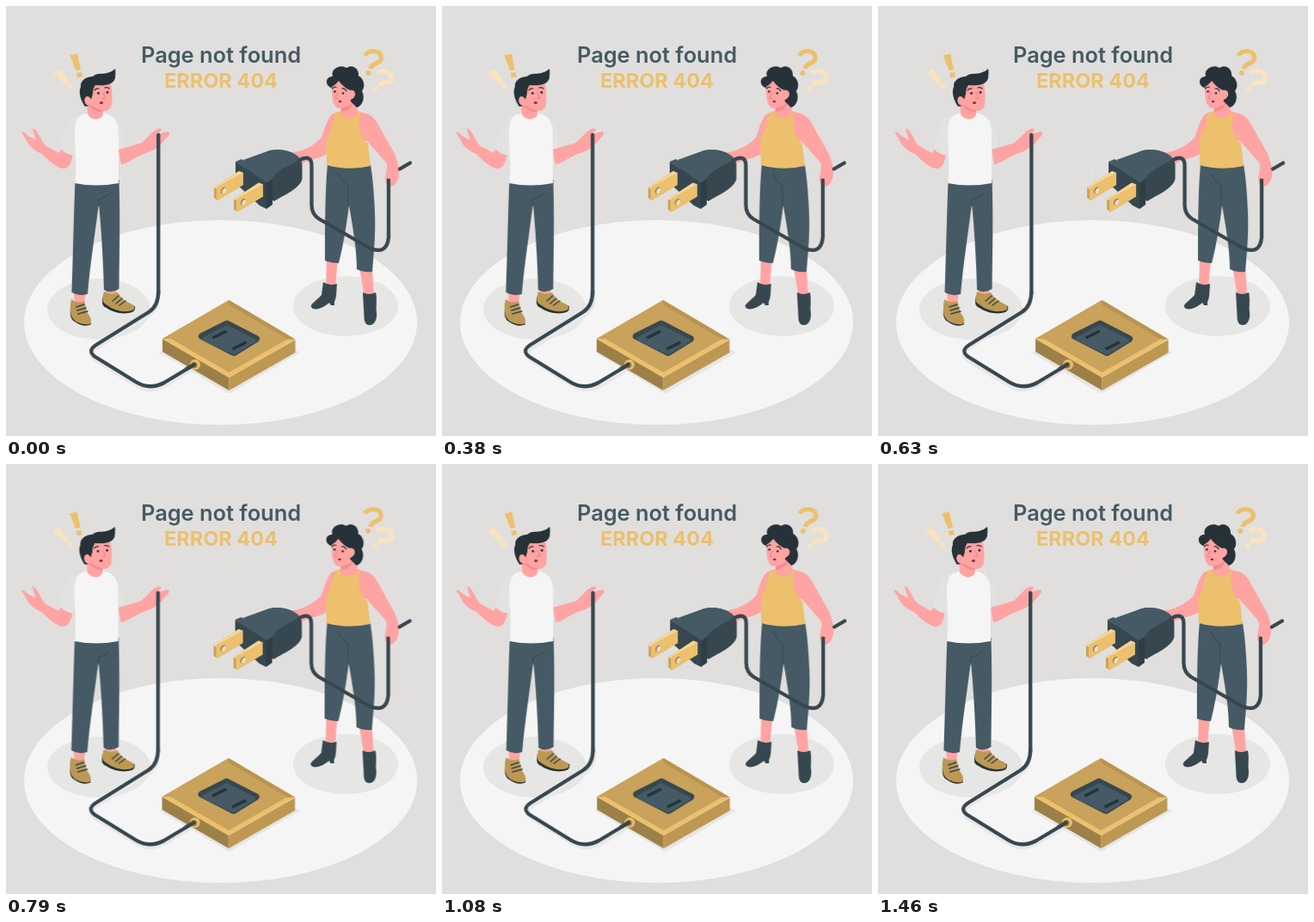
An HTML page without scripts that plays this animation: 500x500 px, repeating every 1500 ms.

```html
<!DOCTYPE html>
<html lang="en">
<head>
<meta charset="utf-8">
<title>Page not found</title>
<style>
  html, body { margin: 0; width: 100%; height: 100%; overflow: hidden; background: #e0dfdd; }
  svg { display: block; width: 100%; height: 100%; }
  text { font-family: Inter, Roboto, sans-serif; text-anchor: middle; }
  .title { font-size: 25.4px; font-weight: 600; fill: #455a64; }
  .code { font-size: 23.5px; font-weight: 750; fill: #ecc06c; }

  .skin { fill: #ffa3a3; }
  .blush { fill: #f58b8d; }
  .ink { fill: #263238; }
  .dark { fill: #37474f; }
  .slate { fill: #455a64; }
  .gold { fill: #ecc06c; }
  .ochre { fill: #c9a25b; }
  .tan { fill: #bd9853; }
  .bronze { fill: #9d8047; }
  .cream { fill: #f9e4bd; }
  .shade { fill: #e6e6e5; }
  .sleeve { fill: #e2e2e1; }
  .line { fill: none; stroke-linecap: round; stroke-linejoin: round; }
  .cable { stroke: #37474f; stroke-width: 4.3; }
  .crease { stroke: #37474f; stroke-width: 1; }
  .face { stroke: #263238; stroke-width: 1.2; }

  .shake { animation: shake 1.5s linear -24ms infinite; }
  @keyframes shake {
    0%, 100% { transform: translateX(0); }
    10%, 90% { transform: translateX(-1px); }
    20%, 80% { transform: translateX(2px); }
    30%, 50%, 70% { transform: translateX(-4px); }
    40%, 60% { transform: translateX(4px); }
  }
</style>
</head>
<body>
<svg viewBox="0 0 500 500">
  <defs>
    <g id="prong">
      <path class="ochre" d="M242 211 L271 192 L276 194 V208 L246 226 L242 223Z"/>
      <path class="gold" d="M245 213 Q245 211 247 210 L276 194 V208 L247 225.500 Q245 226 245 224Z"/>
      <path fill="#f7d596" d="M242 211 L271 192 L276 194 L247 210 Q245 211 245 213Z"/>
      <ellipse class="bronze" cx="253" cy="214.500" rx="2.700" ry="4.200" transform="rotate(25 253 214.500)"/>
      <ellipse fill="#e6e3dd" cx="253.800" cy="215" rx="2" ry="3.500" transform="rotate(25 253.800 215)"/>
    </g>
    <path id="floorCable" class="line" d="M177.300 332 Q177.300 349 166 356 L105 394 Q94 401 104 408 L151 437 Q167 447 184 438 L219 417"/>
  </defs>

  <!-- floor and shadows -->
  <ellipse fill="#f5f5f5" cx="249.500" cy="368" rx="228.500" ry="119"/>
  <ellipse class="shade" cx="108" cy="352.500" rx="60" ry="35.500"/>
  <ellipse class="shade" cx="395" cy="349" rx="61" ry="35"/>
  <use href="#floorCable" y="4" stroke="#e8e8e8" stroke-width="4"/>
  <path fill="#e6e6e6" d="M178 403 L259 357 L342 403 L262 449.500 Q259 451 256 449Z"/>

  <text class="title" x="250" y="66">Page not found</text>
  <text class="code" x="250" y="95">ERROR 404</text>

  <g class="shake">
    <!-- punctuation -->
    <g class="gold">
      <path d="M74.500 57.500 L83 55.500 L87 74 L81.500 75Z"/>
      <path d="M82 78 L87.800 76.800 L89 82.300 L83.200 83.500Z"/>
    </g>
    <g class="cream">
      <path d="M55.500 78.500 L62 73 L73.500 87.500 L69 91.300Z"/>
      <path d="M70 93 L74.500 89.300 L78.300 94 L74 97.700Z"/>
    </g>
    <g class="line" stroke-width="5.300" style="stroke-linecap:butt">
      <path stroke="#ecc06c" d="M418 58 C420 51 436 50 436.500 60 C437 68 425 65 424.500 73"/>
      <path stroke="#f9e4bd" d="M432 78.500 C438 72 451 77 448.500 86 C446 93 439 85 433.500 92"/>
    </g>
    <circle class="gold" cx="421.500" cy="78" r="3"/>
    <circle class="cream" cx="429.500" cy="96" r="2.900"/>

    <!-- man -->
    <path class="skin" d="M78 170 C77 182 73 190 66 189 C59 188 50 180 42 172 C34 169 27 163 25 158 L18.500 147 C20 145 24 149 26 151 L35 156 L31 143 C33 141 36 146 39 151 C42 156 43 160 47 163 L62 171 L66 163Z"/>
    <path class="skin" d="M131 167 C145 163 152 161 158 159 L170 147 C174 143 181 141 181 144 L177 149 L188 146 C192 147 190 150 187 153 L181 160 C175 167 166 170 160 172 C150 176 140 184 134 184Z"/>
    <path class="sleeve" d="M84 127 C73 130 68 145 63 164 C67 171 73 173 80 174 L88 150Z"/>
    <path class="sleeve" d="M126 131 C134 138 137 150 139 160 Q136 165 130 167Z"/>
    <path class="skin" d="M79 332 H93 L91 347 H80Z M116 328 H129 L128 339 H116Z"/>
    <path class="ink" d="M76 344 C74 356 74 364 80 367 C86 372 95 373 99 370 L96 360Z M113 337 C111 346 112 349 117 351 C125 357 138 359 147 356 Q151 354 150 349Z"/>
    <path class="tan" d="M76 341 C75 350 74 357 77 362 C80 368 90 371 97 370 C101 368 99 362 95 357 L91 343 Q84 347 76 341Z"/>
    <path class="tan" d="M114 332 C112 340 112 344 115 346 C121 351 131 356 141 355 C149 355 152 351 147 347 C140 344 134 340 130 333 Q122 337 114 332Z"/>
    <path class="line" stroke="#37474f" stroke-width="1.500" d="M82 350 L91 347 M83 354 L93 351 M84 358 L95 355 M124 343 L131 337 M128 346 L135 340 M132 348 L139 343"/>
    <path class="slate" d="M80.500 203 L131.500 202 C133 245 132 285 131.500 329 Q122 335 114 330 C113 295 111 260 108 230 C104 262 98 300 95 335 Q85 338 76.500 333 C78 290 79 240 80.500 203Z"/>
    <path class="line crease" d="M108 233 L107.500 225 Q114 224 121 218"/>
    <path fill="#f5f5f5" d="M90 126 Q104 121 115 125 C127 127 131 135 131 151 V206 Q105 211 80 206 C83 185 80 165 80 150 C80 136 82 128 90 126Z"/>
    <path class="skin" d="M94 107 L95 126 C100 134 111 133 113 126 L113 115Z"/>
    <path class="blush" d="M97 115 Q103 124 113 123 V120Z"/>
    <path class="skin" d="M96 92 L121 87 C124 97 124 108 123 115 C121 122 116 123 111 121 C105 120 100 116 97 113Z"/>
    <path class="ink" d="M92 117 C87 110 84 100 87 94 C86 87 93 82 101 82 C106 77 113 80 119 77.500 Q124 76 127 73 C128 77 127 81 127 84 C125 91 117 93 104 92 Q101 96 101 102 L97 116Z"/>
    <ellipse class="skin" cx="95.500" cy="110.500" rx="4" ry="5.500" transform="rotate(-18 95.500 110.500)"/>
    <path class="line face" d="M103 98 Q105 95.500 108 96 M115 95 Q118 94 120 96"/>
    <circle class="ink" cx="107.500" cy="101.500" r="1.400"/>
    <circle class="ink" cx="118" cy="100.500" r="1.400"/>
    <path class="line" stroke="#f07c80" d="M113 101 L116 107 L112.500 107.500"/>
    <ellipse fill="#7b2d38" cx="111" cy="112.500" rx="2" ry="1.500"/>
    <path class="line cable" d="M177.300 150 V334"/>
    <use href="#floorCable" class="cable"/>

    <!-- socket -->
    <path class="bronze" d="M182 387 L259.500 432 V447 L182 402Z"/>
    <path class="tan" d="M336.500 388 L259.500 432 V447 L336.500 403Z"/>
    <path class="gold" d="M259.500 342 L336.500 387.500 L259.500 432 L182 387Z"/>
    <path fill="#b8944f" d="M259.500 342 L336.500 387.500 L327 387.500 L259.500 348 L192 387 L182 387Z"/>
    <path class="ochre" d="M259.500 342 L182 387 L192 387 L259.500 348Z"/>
    <path class="ochre" d="M259.500 348 L327 387.500 L259.500 426 L192 387Z"/>
    <path class="dark" stroke="#37474f" stroke-width="8" stroke-linejoin="round" d="M228 384 L257 369.500 L291 387 L265 403Z"/>
    <path class="slate" stroke="#455a64" stroke-width="4" stroke-linejoin="round" d="M230 387 L257 373 L289 389 L265 403.500Z"/>
    <path stroke="#263238" stroke-width="3.400" d="M240.500 386 L256.500 378 M263.500 399 L279.500 391"/>
    <circle class="gold" cx="220" cy="417" r="6"/>
    <circle class="bronze" cx="219" cy="417.500" r="3.700"/>
    <path class="line cable" d="M210 422 L219 417"/>

    <!-- plug -->
    <path class="line" stroke="#e6e5e4" d="M218 217 L238 216 M224 198 L241 208 M245 186 L250 202"/>
    <path class="skin" d="M380 125 C373 132 371 143 367 153 C360 161 350 166 341 169 L323 172 C321 176 327 177 330 178 L345 183 L354 179 C365 177 375 172 379 167 L388 140Z"/>
    <path class="dark" d="M278 179 L307 168 C322 165 343 171 344.500 184 V201 C342 212 325 219 312 227 L281 210Z"/>
    <path class="slate" d="M276 179 L307 168 C321 165 337 170 342 178 C334 184 317 189 310 200Z"/>
    <path fill="#2f3e46" d="M303 205 L310 200 V231 L303 236Z"/>
    <path class="slate" d="M267 181 L274 178 L311 200 L303 206Z"/>
    <path class="dark" d="M267 181 L303 205 V236 L295 232 L267 206Z"/>
    <use href="#prong"/>
    <use href="#prong" x="23" y="13.500"/>

    <!-- woman -->
    <path class="skin" d="M373 295 H386 L383 327 H372Z M411 304 H426 L428 338 H417Z"/>
    <path class="dark" d="M369 321 Q376 326 385 323 C384 332 385 338 382 344 V348 H378 L376 345 C368 352 358 355 355 350 C353 347 362 342 367 336Z"/>
    <path class="dark" d="M415 333 Q422 337 430 333 C432 342 430 350 431 356 C432 365 428 372 422 371 C415 370 417 360 416 352Z"/>
    <path class="slate" d="M374 184 Q400 191 424 184 C427 202 428 220 429 240 C430 265 428 285 426 309 Q416 310 408 306 C408 285 404 260 399 232 C396 255 393 275 387 299 Q378 299 371 296 C371 262 371 215 374 184Z"/>
    <path class="line crease" d="M387 195 Q391 206 398 208 V232"/>
    <path class="skin" d="M381 125 Q400 117 415 124 C426 126 431 133 434 140 L452 172 C456 182 458 190 457 196 C456 204 452 209 447 210 C441 208 440 202 442 196 C443 190 444 186 442 182 L420 157 L380 150Z"/>
    <path class="gold" d="M383 124 L389 123 C391 133 406 133 408 123 L412 124 C408 138 412 152 421 160 L424 186 Q398 192 373 185 C373 172 372 160 373 153 C378 147 380 135 383 124Z"/>
    <path class="skin" d="M389 112 L390 127 C394 132 407 131 409 125 L408 107Z"/>
    <path class="blush" d="M390 118 Q400 118 404 111 Q402 122 390 123Z"/>
    <path class="ink" d="M378 95 C371 92 371 82 380 82 C377 73 389 67 396 72 C404 67 411 74 410 81 C417 85 418 94 414 99 C418 106 415 116 408 118 L394 104Z"/>
    <path class="skin" d="M379 94 Q384 91 387 87 Q393 95 400 98 C407 96 409 106 401 109 C400 115 394 119 387 119 C380 117 379 107 379 94Z"/>
    <path class="line face" d="M379.500 96 Q382 93 384 94.500 M391 96 Q394 95 396 99"/>
    <circle class="ink" cx="382.500" cy="99.500" r="1.300"/>
    <circle class="ink" cx="392" cy="101.500" r="1.300"/>
    <path class="line" stroke="#f07c80" d="M386 101 L383 107 L386 108"/>
    <ellipse fill="#7b2d38" cx="388.500" cy="111" rx="1.700" ry="1.300"/>
    <path class="line cable" d="M341 179.500 C348 175 355.500 175 355.500 185 V231 Q355.500 242 364 247.500 L423 281.500 Q443 290 445 269 V202 M458 189.500 L470 182.500"/>
    <path class="skin" d="M444 190 Q455 188 457 196 C456 204 452 209 448 210 L447 201 L441 200Z"/>
  </g>
</svg>
</body>
</html>
```
